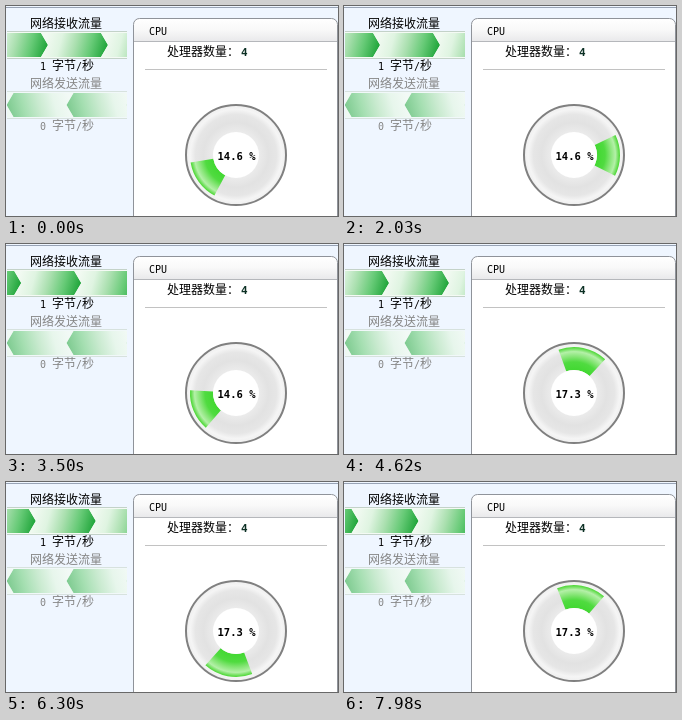
Write an HTML page with a canvas that moves like this. It is 332x210 px and loops after 8000 ms.

```html
<!DOCTYPE html>
<html lang="zh-CN">
<head>
<meta charset="utf-8">
<title>CPU</title>
<style>
html, body { margin: 0; width: 100%; height: 100%; overflow: hidden; background: #eff6ff; }
canvas { display: block; }
</style>
</head>
<body>
<canvas id="stage" width="332" height="210"></canvas>
<script>
const ctx = document.getElementById('stage').getContext('2d');
const LOOP = 8000, STEP = 70, LAST_STEP = 114, HELD_STEP = 45;
const LOAD_CHANGE = 58;
const TURN = 7.46, SHIFT = TURN / 4;
const PITCH = 60, POINT = 7;
const CX = 230, CY = 149;
const HAN = '12px "Noto Sans CJK SC", "Noto Sans CJK", sans-serif';
const LATIN = '10px "DejaVu Sans Mono", monospace';

function fill(gradient, stops) {
  stops.forEach(([at, color]) => gradient.addColorStop(at, color));
  return gradient;
}

function rect(x, y, w, h, color) {
  ctx.fillStyle = color;
  ctx.fillRect(x, y, w, h);
}

// Han and Latin runs use different sizes so that both sit on a 6 px rhythm.
function label(text, x, y, color = '#000') {
  ctx.fillStyle = color;
  for (const run of text.match(/[\u4e00-\u9fff\uff1a]+|[^\u4e00-\u9fff\uff1a]+/g)) {
    ctx.font = run.charCodeAt(0) > 0x4dff ? HAN : LATIN;
    ctx.fillText(run, x, y);
    x += ctx.measureText(run).width;
  }
}

function chevron(tip, top, height) {
  const tail = tip - PITCH, mid = top + height / 2;
  ctx.beginPath();
  ctx.moveTo(tail - POINT, top);
  ctx.lineTo(tip - POINT, top);
  ctx.lineTo(tip, mid);
  ctx.lineTo(tip - POINT, top + height);
  ctx.lineTo(tail - POINT, top + height);
  ctx.lineTo(tail, mid);
  ctx.closePath();
  ctx.fillStyle = fill(ctx.createLinearGradient(tail - 2, top + 4, tip - 3, top + height - 4), [
    [0, '#f2faf2'], [0.25, '#dff4e1'], [0.5, '#a9dfae'], [0.75, '#66ca76'], [1, '#22a63c']
  ]);
  ctx.fill();
}

function flowBar(top, tip, mirrored, alpha) {
  ctx.save();
  ctx.globalAlpha = alpha;
  if (mirrored) {
    ctx.translate(122, 0);
    ctx.scale(-1, 1);
  }
  ctx.beginPath();
  ctx.rect(1, top, 120, 28);
  ctx.clip();
  rect(1, top, 120, 28, '#f4faf4');
  for (let x = tip % PITCH; x < 121 + PITCH + POINT; x += PITCH) chevron(x, top + 2, 24);
  rect(1, top, 120, 1, '#c3d2c8');
  rect(1, top + 27, 120, 1, '#c3d2c8');
  ctx.restore();
}

function panel() {
  rect(0, 0, 332, 210, '#eff6ff');
  rect(0, 1, 332, 1, '#98a3b5');
  ctx.beginPath();
  ctx.roundRect(127.5, 12.5, 204, 220, 6);
  ctx.fillStyle = '#fff';
  ctx.fill();
  ctx.save();
  ctx.clip();
  rect(127, 13, 205, 23, fill(ctx.createLinearGradient(0, 13, 0, 36), [
    [0, '#ffffff'], [0.45, '#f9f9f9'], [1, '#e8e8ea']
  ]));
  rect(127, 35, 205, 1, '#b5b7bb');
  ctx.restore();
  ctx.strokeStyle = '#8f939a';
  ctx.lineWidth = 1;
  ctx.stroke();
  rect(139, 63, 182, 1, '#c2c2c2');
}

function disc(radius, style) {
  ctx.beginPath();
  ctx.arc(CX, CY, radius, 0, Math.PI * 2);
  ctx.fillStyle = style;
  ctx.fill();
}

function gauge(percent, degrees) {
  const start = degrees * Math.PI / 180;
  const end = start + percent / 100 * Math.PI * 2;
  const radial = (inner, outer) => ctx.createRadialGradient(CX, CY, inner, CX, CY, outer);

  disc(50, fill(radial(23, 50), [
    [0, '#ebebeb'], [0.35, '#e2e2e2'], [0.65, '#e6e6e6'], [0.84, '#f5f5f5'], [1, '#efefef']
  ]));
  ctx.strokeStyle = '#808080';
  ctx.lineWidth = 2;
  ctx.stroke();

  ctx.beginPath();
  ctx.arc(CX, CY, 46, start, end);
  ctx.arc(CX, CY, 23, end, start, true);
  ctx.closePath();
  ctx.fillStyle = fill(radial(23, 46), [
    [0, '#42d832'], [0.35, '#50db40'], [0.58, '#86e576'], [0.8, '#b4f0a8'], [1, '#48d630']
  ]);
  ctx.fill();
  disc(23, '#fff');

  ctx.fillStyle = '#000';
  ctx.font = 'bold 10.5px "DejaVu Sans Mono", monospace';
  ctx.textAlign = 'center';
  ctx.fillText(percent.toFixed(1) + ' %', CX + 0.5, 154);
  ctx.textAlign = 'left';
}

function draw(time) {
  let step = Math.min(Math.floor(time % LOOP / STEP), LAST_STEP);
  if (step === HELD_STEP) step--;

  panel();
  label('网络接收流量', 24, 22);
  flowBar(25, 42 + step * SHIFT, false, 1);
  label('1 字节/秒', 34, 64);
  label('网络发送流量', 24, 82, '#858585');
  flowBar(85, PITCH + 1.5, true, 0.55);
  label('0 字节/秒', 34, 124, '#858585');

  label('CPU', 143, 29);
  label('处理器数量：', 161, 50);
  ctx.fillStyle = '#0c3024';
  ctx.font = 'bold 11px "DejaVu Sans Mono", monospace';
  ctx.fillText('4', 235, 50);
  gauge(step < LOAD_CHANGE ? 14.6 : 17.3, 118 + step * TURN);
}

const origin = performance.now();
function tick() {
  draw(performance.now() - origin);
  requestAnimationFrame(tick);
}
tick();
</script>
</body>
</html>
```
